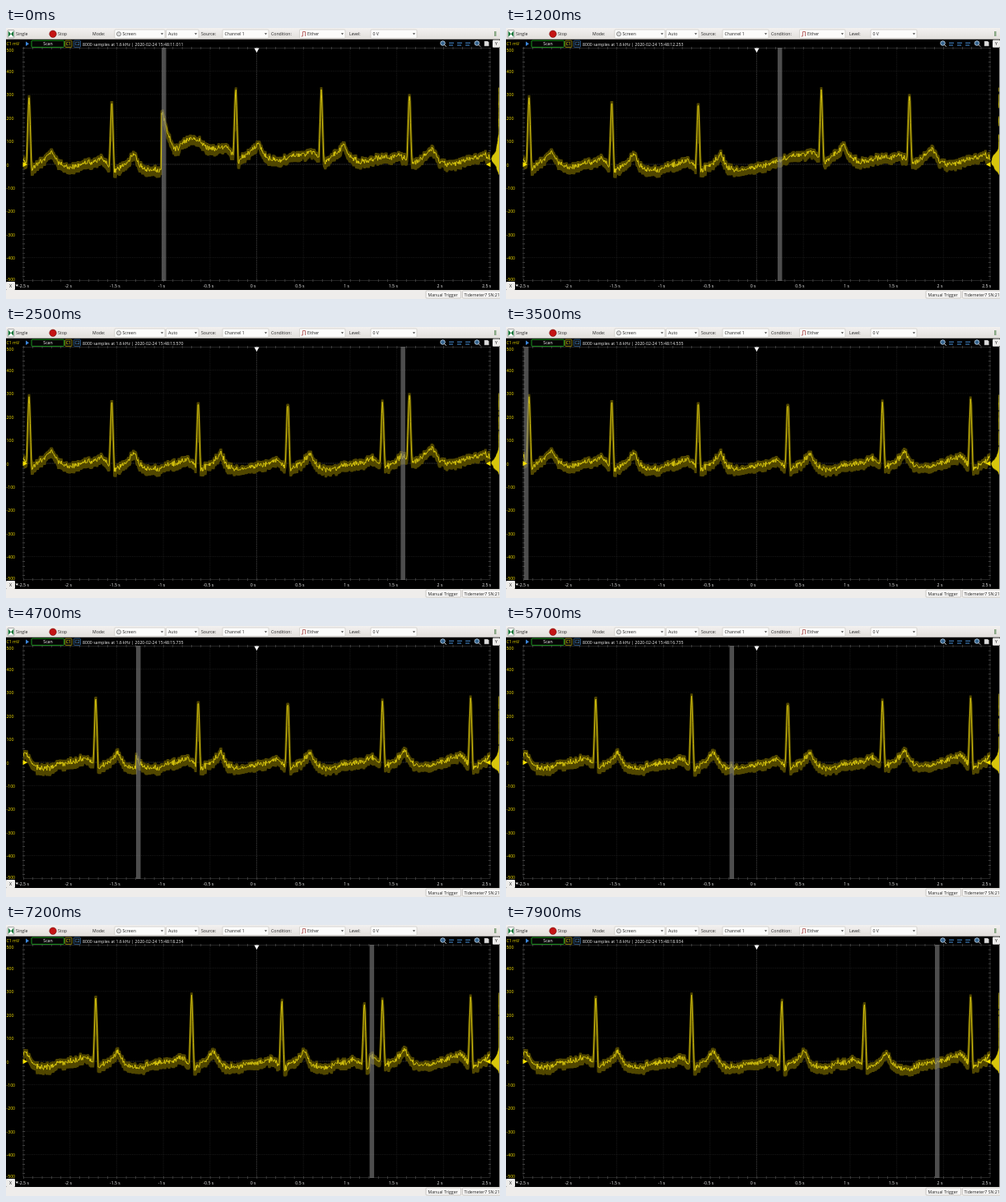
Write an HTML page that moves like this. It is 600 px wide and 330 px high and loops after 8000 ms.

```html
<!DOCTYPE html>
<html lang="en">
<head>
<meta charset="utf-8">
<title>Oscilloscope scan</title>
<style>
  html, body { margin: 0; width: 100%; height: 100%; overflow: hidden; background: #000; }
  svg { display: block; width: 600px; height: 330px; }
  text { font: 5.2px "Open Sans", "Noto Sans", sans-serif; white-space: pre; }
</style>
</head>
<body>
<svg id="stage" viewBox="0 0 600 330">
  <defs>
    <clipPath id="plot"><rect x="21" y="24" width="567.5" height="284"/></clipPath>
    <linearGradient id="bar" x2="0" y2="1">
      <stop stop-color="#f4f2f1"/><stop offset="1" stop-color="#e2dfdc"/>
    </linearGradient>
  </defs>
  <rect width="600" height="330"/>
  <g id="grid" fill="none"></g>
  <g clip-path="url(#plot)">
    <path id="band" fill="#504600"/>
    <path id="line" fill="none" stroke="#e2d010" stroke-width=".9" stroke-linejoin="round"/>
    <rect id="cursor" y="24" width="5.5" height="284" fill="#808080" fill-opacity=".6"/>
  </g>
  <path id="histogram" fill="#d8c60c"/>
  <path d="M20.5 163.2l5.5 3-5.5 3zM588.5 163.2l-5.5 3 5.5 3z" fill="#f5e000"/>
  <path d="M301.5 24.5h6l-3 5.5z" fill="#fff"/>
  <g id="chrome"></g>
  <text id="status" x="93" y="21.6" fill="#f2f2f2" style="font-size:5.16px"></text>
</svg>
<script>
const LOOP = 8000, TICK = 100;
const LEFT = 21, WIDTH = 567, ZERO = 166, STEP = 0.7;
const COUNT = Math.ceil(WIDTH / STEP) + 1;
const el = id => document.getElementById(id);

// ---------- static parts ----------
const label = (x, y, s, fill = '#222', extra = '') =>
  `<text x="${x}" y="${y}" fill="${fill}" ${extra}>${s}</text>`;
const box = (x, y, w, h, fill, stroke = 'none') =>
  `<rect x="${x}" y="${y}" width="${w}" height="${h}" rx="1" fill="${fill}" stroke="${stroke}" stroke-width=".7"/>`;
const path = (d, fill, stroke = 'none', extra = '') =>
  `<path d="${d}" fill="${fill}" stroke="${stroke}" ${extra}/>`;
const combo = (x, w, s, textX = x + 2.5) =>
  box(x, 2, w, 10.5, '#fcfcfb', '#c9c6c2') + label(textX, 9.2, s) +
  path(`M${x + w - 5} 6.3h3l-1.5 2z`, '#444');

function drawGrid() {
  const gridLine = (d, middle) => path(d, 'none', middle ? '#4c4c4c' : '#272727',
    `stroke-width=".7" stroke-dasharray="${middle ? '1 .6' : '1 1.2'}"`);
  let out = '';
  for (let i = 1; i < 10; i++) {
    out += gridLine(`M21 ${24 + i * 28.4}H588`, i === 5);
    out += gridLine(`M${LEFT + i * 56.7} 24V308`, i === 5);
  }
  out += path('M21 24.5H588M21 307.5H588', 'none', '#555', 'stroke-width="3" stroke-dasharray=".7 10.64"');
  out += path('M21.5 24V308M587.5 24V308', 'none', '#555', 'stroke-width="3" stroke-dasharray=".7 4.98"');
  out += path('M21 24.5H588V307.5H21Z', 'none', '#3c3c3c', 'stroke-width=".6"');
  el('grid').innerHTML = out;
}

function drawChrome() {
  let out = box(-1, -1, 602, 14.8, 'url(#bar)');
  out += box(2, 2.5, 8, 9.5, '#fff', '#8a8a8a') + path('M2.8 3.5L6 7.2 2.8 11zM9.2 3.5L6 7.2 9.2 11z', '#17773a');
  out += label(12, 9.2, 'Single') + '<circle cx="57" cy="7.3" r="4.2" fill="#c41414" stroke="#701010" stroke-width=".6"/>';
  out += label(63, 9.2, 'Stop') + label(105, 9.2, 'Mode:');
  out += combo(132, 61, 'Screen', 141.5) + '<circle cx="137" cy="7.3" r="2.6" fill="#ddd" stroke="#666" stroke-width=".7"/>';
  out += combo(194.5, 39.5, 'Auto') + label(237, 9.2, 'Source:') + combo(263, 56, 'Channel 1');
  out += label(322, 9.2, 'Condition:') + combo(356.5, 55.5, 'Either', 366);
  out += path('M358.5 10h2V4.5h3V10', 'none', '#a03030', 'stroke-width=".7"');
  out += label(417, 9.2, 'Level:') + combo(443, 56, '0 V');
  out += path('M593 4h2.5v6H593z', '#8ba887');

  out += label(.5, 21.4, 'C1 mV', '#f5e000') + path('M24 16.5l4 2.8-4 2.8z', '#3c85d8');
  out += box(31, 15.2, 39.5, 8.2, '#050505', '#27d32d') + label(51, 21.4, 'Scan', '#fff', 'text-anchor="middle" font-weight="700"');
  out += box(71.8, 15.2, 8.2, 8.2, '#111', '#b8a900') + label(72.7, 21.4, 'C1', '#f5e000', 'font-weight="700"');
  out += box(82.3, 15.2, 8.2, 8.2, '#111', '#346fae') + label(83.4, 21.4, 'C2', '#4a9dec');

  const lens = x => `<circle cx="${x}" cy="18.5" r="2.8" fill="#36658f" stroke="#c5d6e6" stroke-width=".8"/>` +
    path(`M${x + 2} 20.5l2.2 2.2`, 'none', '#ccc');
  out += lens(530.5) + lens(572);
  for (const x of [538, 548, 558]) out += path(`M${x} 17.5h6v1.4h-6zM${x} 20.3h5v1.4h-5z`, '#31608f');
  out += path('M581 16h4l1.5 1.5V22H581z', '#ddd', '#777', 'stroke-width=".5"');
  out += box(591, 14.4, 9, 9.4, '#eeedeb') + label(595.5, 21.3, 'Y', '#111', 'text-anchor="middle" font-weight="700"');

  for (let v = 500; v >= -500; v -= 100) {
    const y = v === 500 ? 29 : v === -500 ? 308 : ZERO - v * .284 + 2.6;
    out += label(.5, y, v, '#f5e000');
  }
  out += box(0, 309, 11, 10, '#eeedeb') + label(5.5, 316.2, 'X', '#111', 'text-anchor="middle" font-weight="700"');
  out += path('M11.5 312.5h3.5l-1.7 2.4z', '#eee');
  for (let s = -2.5; s <= 2.5; s += .5) {
    const x = LEFT + (s + 2.5) * 113.4 - (s < -2 ? -.5 : s < 0 ? 2 : 4.3);
    out += label(x, 316, s + ' s', '#eee', 'text-anchor="middle"');
  }

  out += box(-1, 319, 602, 12, '#efedeb') + box(510, 320, 42.5, 9, '#f7f6f5', '#bbb8b4');
  out += label(512.5, 326.6, 'Manual Trigger') + box(554.5, 320, 50, 9, '#f7f6f5', '#bbb8b4');
  out += label(556.5, 326.6, 'Tidemeter7 SN:21');
  out += path('M599.5 24V319', 'none', '#d8d8d8', 'stroke-width=".7"');
  el('chrome').innerHTML = out;
}

// ---------- signal ----------
function random(seed) {
  return () => {
    seed = (seed + 0x6D2B79F5) | 0;
    let t = Math.imul(seed ^ seed >>> 15, 1 | seed);
    t = t + Math.imul(t ^ t >>> 7, 61 | t) ^ t;
    return ((t ^ t >>> 14) >>> 0) / 4294967296;
  };
}

// A beat: x of the R peak, peak y, baseline shift, level before the P wave.
function beatKnots([x, peak, base, before]) {
  const at = (dx, dy) => [x + dx, ZERO + base + dy];
  const pre = dx => [x + dx, ZERO + before];
  return [
    pre(-22), [x - 13, ZERO + before - 4], pre(-8), at(-3, 3),
    [x - .4, peak], [x + .4, peak], at(3, 9), at(7, 5), at(16, 0), at(22, -6),
    at(26, -12), at(28, -12), at(32, -3), at(36, 3), at(45, 7.5), at(57, 7), at(67, 2.5)
  ];
}

function makeSweep(seed, beats, lead = []) {
  const knots = [...lead, ...beats.flatMap(beatKnots)];
  const rnd = random(seed);
  let k = 0;
  return Array.from({ length: COUNT }, (_, i) => {
    const x = LEFT + i * STEP;
    while (k < knots.length - 2 && knots[k + 1][0] < x) k++;
    const [x0, y0] = knots[k], [x1, y1] = knots[k + 1];
    const u = Math.min(1, Math.max(0, (x - x0) / (x1 - x0)));
    return y0 + (y1 - y0) * u + (rnd() + rnd() - 1) * 4.2;
  });
}

const sweeps = [
  makeSweep(11, [[279, 77, -13, -19], [383, 79, -11, -12], [490, 80, -8, -8], [595, 83, -4, -8]],
    [[190, 103], [197, 130], [204, 148], [209, 147], [215, 139], [225, 135], [235, 137], [243, 146]]),
  makeSweep(23, [[28, 84, -4, -5], [128.5, 93, 0, -3], [233.5, 93, 0, -1], [342.3, 93, 0, 0],
    [457.3, 93, -2, -2], [564.3, 91, 0, -5]]),
  makeSweep(37, [[-3, 91, 0, -5], [109, 90, 0, -2], [225.5, 89, 0, -1], [335, 96, 0, 1],
    [435.3, 96, 2, 1], [545, 92, 0, 0]])
];

// ---------- motion ----------
const drift = [[0, 0], [1200, 42], [2500, 59], [3500, 24], [8000, 23]];

function clockAt(t) {
  const i = drift.findIndex(d => d[0] > t);
  const [t0, d0] = drift[i - 1], [t1, d1] = drift[i];
  return Math.round(t + d0 + (d1 - d0) * (t - t0) / (t1 - t0));
}

const f = n => n.toFixed(1);

function render(t) {
  const clock = clockAt(t);
  const travelled = 168 + clock * .11347;
  const pass = Math.floor(travelled / WIDTH);
  const head = travelled % WIDTH;
  const ys = sweeps[pass + 1].map((y, i) => i * STEP < head ? y : sweeps[pass][i]);

  let line = '', top = '', bottom = '';
  const bins = {};
  ys.forEach((y, i) => {
    const x = f(LEFT + i * STEP);
    const near = ys.slice(Math.max(0, i - 2), i + 3);
    line += (i ? 'L' : 'M') + x + ' ' + f(y);
    top += (i ? 'L' : 'M') + x + ' ' + f(Math.min(...near) - 3);
    bottom = 'L' + x + ' ' + f(Math.max(...near) + 6.5) + bottom;
    for (let d = -2; d <= 2; d++) {
      const bin = Math.round(y) + d;
      bins[bin] = (bins[bin] || 0) + 1;
    }
  });
  el('line').setAttribute('d', line);
  el('band').setAttribute('d', top + bottom + 'Z');
  el('cursor').setAttribute('x', f(LEFT + head));

  const most = Math.max(...Object.values(bins));
  el('histogram').setAttribute('d', Object.entries(bins).map(([y, n]) => {
    const w = f(.6 + 9 * n / most);
    return `M599 ${y - .5}h-${w}v1h${w}z`;
  }).join(''));

  const ms = 11011 + clock;
  const seconds = Math.floor(ms / 1000) + '.' + String(ms % 1000).padStart(3, '0');
  el('status').textContent = `8000 samples at 1.6 kHz | 2020-02-24 15:48:${seconds}`;
}

drawGrid();
drawChrome();
const start = performance.now();
let shown = -1;
function frame() {
  const t = Math.floor((performance.now() - start) % LOOP / TICK) * TICK;
  if (t !== shown) render(shown = t);
  requestAnimationFrame(frame);
}
frame();
</script>
</body>
</html>
```
